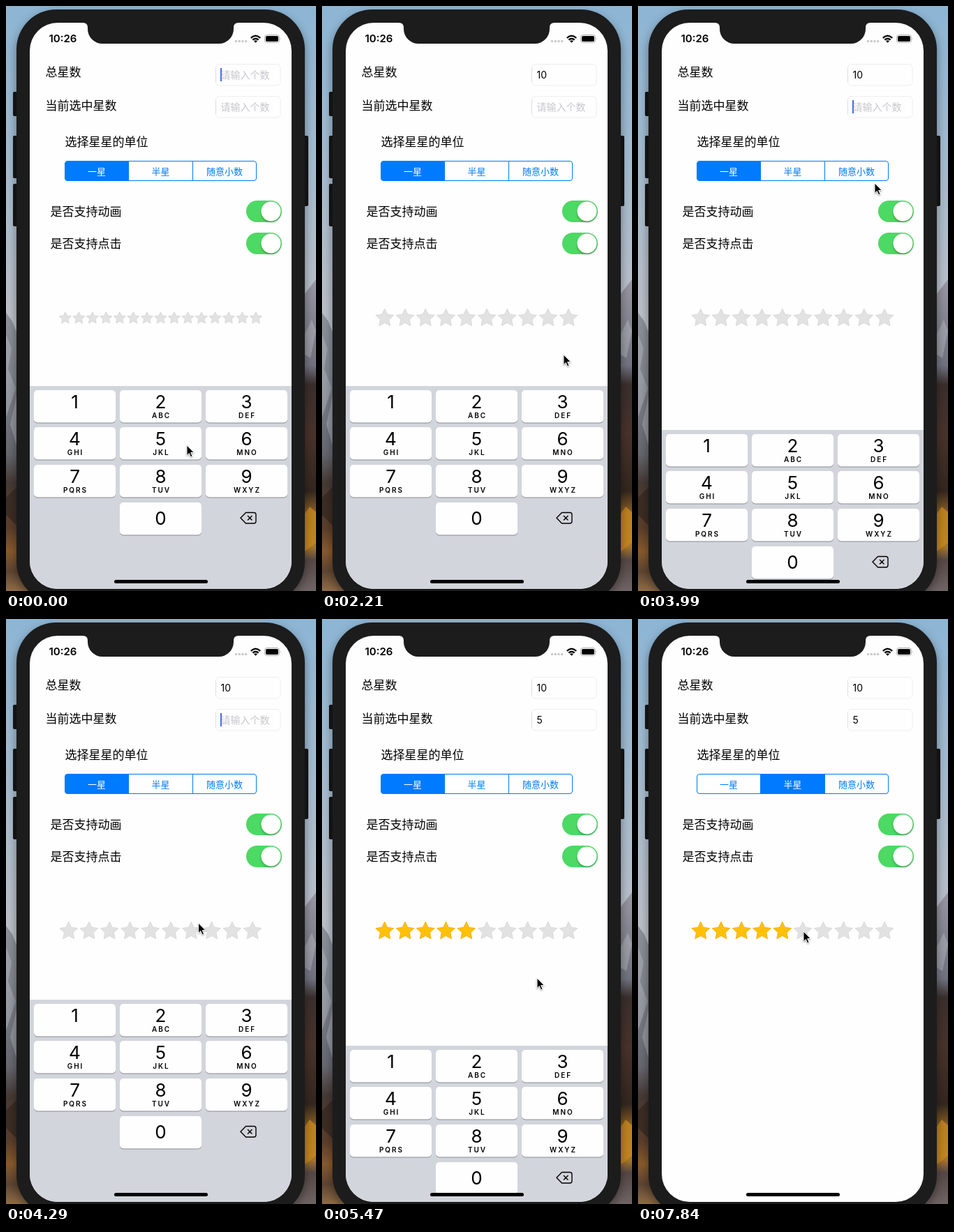
Write an HTML page that moves like this. It is 444x839 px and loops after 7.99 s.

```html
<!DOCTYPE html>
<html lang="zh-CN">
<head>
<meta charset="utf-8">
<style>
html, body { margin: 0; width: 100%; height: 100%; overflow: hidden; }
svg { display: block; width: 444px; height: 839px; font-family: Inter, "Noto Sans CJK SC", "Noto Sans CJK", sans-serif; }
.label { font-size: 17px; }
.field { font-size: 14px; }
.hint { fill: #c7c7cd; }
.seg { font-size: 13px; text-anchor: middle; }
.digit { font-size: 26px; text-anchor: middle; }
.abc { font-size: 10px; font-weight: 600; letter-spacing: 2px; text-anchor: middle; }
</style>
</head>
<body>
<svg id="stage" viewBox="0 0 444 839">
  <defs>
    <linearGradient id="sky" x2="0" y2="1">
      <stop stop-color="#8cb5d4"/><stop offset=".13" stop-color="#98b9d3"/>
      <stop offset=".32" stop-color="#a9bccd"/><stop offset=".52" stop-color="#bcc0c9"/>
    </linearGradient>
    <linearGradient id="rock" gradientUnits="userSpaceOnUse" x2="0" y1="430" y2="839">
      <stop stop-color="#8f939c"/><stop offset=".25" stop-color="#82868f"/>
      <stop offset=".52" stop-color="#66676f"/><stop offset=".62" stop-color="#463a35"/>
      <stop offset=".78" stop-color="#5c3e2a"/><stop offset=".86" stop-color="#8a5b2c"/>
      <stop offset=".93" stop-color="#5f4532"/><stop offset="1" stop-color="#8f6c46"/>
    </linearGradient>
    <linearGradient id="cliff" gradientUnits="userSpaceOnUse" x2="0" y1="390" y2="839">
      <stop stop-color="#9a98a3"/><stop offset=".28" stop-color="#717380"/>
      <stop offset=".34" stop-color="#3a2f2d"/><stop offset=".5" stop-color="#49332b"/>
      <stop offset=".68" stop-color="#33271f"/><stop offset=".75" stop-color="#8a5f25"/>
      <stop offset=".86" stop-color="#a8762a"/><stop offset=".9" stop-color="#564846"/>
      <stop offset="1" stop-color="#6f6564"/>
    </linearGradient>
    <clipPath id="screen"><rect x="34" y="24" width="375" height="812" rx="40"/></clipPath>
  </defs>

  <rect width="444" height="839" fill="url(#sky)"/>
  <path d="M0 440L9 452 16 470 34 490V839H0z" fill="url(#rock)"/>
  <path d="M0 470L8 492 3 520 14 548 0 590zM15 560L6 600 15 630z" fill="#b7bac0" opacity=".45"/>
  <path d="M0 705L15 690V745L0 730z" fill="#33261f" opacity=".7"/>
  <path d="M410 440L430 410 444 392V839H410z" fill="url(#cliff)"/>
  <path d="M428 470L438 450 444 466 436 505 428 500z" fill="#c6c5cb" opacity=".4"/>
  <path d="M428 728L435 718 444 726V770L428 782z" fill="#c98a20" opacity=".8"/>

  <g fill="#171717">
    <rect x="10" y="123" width="8" height="35" rx="2"/>
    <rect x="10" y="186" width="8" height="61" rx="2"/>
    <rect x="10" y="255" width="8" height="61" rx="2"/>
    <rect x="425" y="186" width="8" height="101" rx="2"/>
  </g>
  <rect x="15" y="5" width="413" height="850" rx="57" fill="#1c1c1c" style="filter:drop-shadow(0 6px 7px #0006)"/>

  <g clip-path="url(#screen)">
    <rect x="34" y="24" width="375" height="812" fill="#fefefe"/>
    <text x="61.5" y="52" font-size="15" font-weight="600">10:26</text>
    <g fill="#c8c8cb">
      <circle cx="329.5" cy="50.5" r="1.7"/><circle cx="334.3" cy="50.5" r="1.7"/>
      <circle cx="339" cy="50.5" r="1.7"/><circle cx="343.7" cy="50.5" r="1.7"/>
    </g>
    <g fill="none" stroke="#000" stroke-width="2.3">
      <path d="M350.8 45.8Q357.5 39.4 364.2 45.8M353.4 48.6Q357.5 44.8 361.6 48.6"/>
    </g>
    <path d="M355 50.3Q357.5 48.2 360 50.3L357.5 52.8z"/>
    <rect x="370.5" y="41.5" width="21" height="11" rx="3.2" fill="none" stroke="#aaa"/>
    <rect x="372" y="43" width="18" height="8" rx="1.8"/>
    <path d="M392.8 45.2q1.5 1.8 0 3.6z" fill="#aaa"/>

    <g class="label">
      <text x="56.5" y="101">总星数</text>
      <text x="56.5" y="149">当前选中星数</text>
      <text x="84.5" y="201">选择星星的单位</text>
      <text x="63.5" y="301">是否支持动画</text>
      <text x="63.5" y="347">是否支持点击</text>
    </g>
    <g id="boxes" fill="none"></g>
    <text id="total" class="field" x="307.5"/>
    <text id="chosen" class="field" x="307.5"/>
    <rect id="caret" width="2" height="19" fill="#426bf2"/>
    <g id="segments"></g>
    <g id="switches"></g>
    <g id="stars" stroke-width=".9" stroke-linejoin="round"></g>
    <g id="keyboard"></g>
    <rect x="155" y="823" width="134" height="5" rx="2.5"/>
    <path d="M110 23V24Q117 24 117 31V33A21 21 0 0 0 138 54H305A21 21 0 0 0 326 33V31Q326 24 333 24V23z" fill="#1c1c1c"/>
  </g>
  <path id="pointer" d="M0 0V14.6L3.3 11.5 5.6 16.8 8 15.8 5.7 10.5H10.3z" stroke="#fff" stroke-width="1" style="filter:drop-shadow(0 1px 1px #0006)"/>
</svg>
<script>
const LOOP = 7990, STEP = 148, KEYBOARD = 291;
const $ = id => document.getElementById(id);

// Pointer stops: step, x, y
const path = [
  [0, 259, 630], [3, 104, 578], [5, 104, 578], [8, 215, 712], [9, 216, 728], [11, 216, 728],
  [14, 346, 500], [21, 346, 500], [25, 342, 146], [26, 342, 146], [27, 339, 254],
  [31, 212, 618], [32, 212, 620], [33, 212, 620], [36, 308, 515], [42, 308, 515],
  [45, 231, 257], [47, 222, 232], [48, 222, 232], [50, 262, 365], [52, 240, 440], [53, 237, 448]
];
const presses = { 4: 1, 10: 0, 32: 5 };
const letters = ['', 'ABC', 'DEF', 'GHI', 'JKL', 'MNO', 'PQRS', 'TUV', 'WXYZ'];

function key(n) {
  const i = n ? n - 1 : 10;
  const x = 40 + i % 3 * 123, y = Math.floor(551 + Math.floor(i / 3) * 53.7), mid = x + 58.5;
  return `<rect x="${x}" y="${y + 1}" width="117" height="46.5" rx="5" fill="#898b8f"/>
    <rect id="key${n}" x="${x}" y="${y}" width="117" height="46.5" rx="5"/>
    <text class="digit" x="${mid}" y="${y + (n ? 26 : 32)}">${n}</text>
    <text class="abc" x="${mid + 1}" y="${y + 39.5}">${n ? letters[i] : ''}</text>`;
}

$('keyboard').innerHTML = '<rect x="34" y="545" width="375" height="292" fill="#d2d5db"/>' +
  [...Array(10).keys()].map(key).join('') +
  `<path d="M343.5 726.5H355Q358 726.5 358 729.5V739Q358 742 355 742H343.5L336 734.2zM346 731l6.5 6.5m0-6.5l-6.5 6.5"
    fill="none" stroke="#000" stroke-width="1.4" stroke-linejoin="round"/>`;

$('boxes').innerHTML = [83.5, 129.5].map(y =>
  `<rect x="300.5" y="${y}" width="92.5" height="30.5" rx="5" stroke="#ccc" stroke-width=".33"/>
   <path d="M300.5 ${y + 5}v20.5" stroke="#dedede"/>`).join('');

$('switches').innerHTML = [279, 325].map(y =>
  `<rect x="344" y="${y}" width="51" height="31" rx="15.5" fill="#4cd964"/>
   <circle cx="379.5" cy="${y + 15.5}" r="14" fill="#fff" style="filter:drop-shadow(0 2px 1.5px #0004)"/>`).join('');

function drawSegments(active) {
  const edges = [84.5, 175.5, 267.5, 358.5];
  const fill = active ? 'M175.5 222.5h92v28h-92z' : 'M175.5 222.5h-87q-4 0-4 4v20q0 4 4 4h87z';
  $('segments').innerHTML = `<path d="${fill}" fill="#007aff"/>
    <rect x="84.5" y="222.5" width="274" height="28" rx="3.5" fill="none" stroke="#007aff"/>
    <path d="M175.5 222v29M267.5 222v29" stroke="#007aff"/>` +
    ['一星', '半星', '随意小数'].map((s, i) =>
      `<text class="seg" x="${(edges[i] + edges[i + 1]) / 2}" y="241.5" fill="${i === active ? '#fff' : '#007aff'}">${s}</text>`).join('');
}

function star(cx, cy, r) {
  return Array.from({ length: 10 }, (_, i) => {
    const a = i * Math.PI / 5, d = i % 2 ? r * .49 : r;
    return `${(cx + d * Math.sin(a)).toFixed(2)},${(cy - d * Math.cos(a)).toFixed(2)}`;
  }).join(' ');
}

function drawStars(count, gold) {
  const [r, first] = count === 15 ? [9, 84.8] : [13.5, 89.7];
  const pitch = (442.8 - 2 * first) / (count - 1);
  $('stars').innerHTML = Array.from({ length: count }, (_, i) => {
    const colors = i < gold ? 'fill="#ffc107" stroke="#f7ab0a"' : 'fill="#e2e2e2" stroke="#d6d6d6"';
    return `<polygon points="${star(first + i * pitch, 447.7, r)}" ${colors}/>`;
  }).join('');
}

function setField(id, value, y) {
  const el = $(id);
  el.textContent = value || '请输入个数';
  el.setAttribute('y', value ? y : y + .5);
  el.classList.toggle('hint', !value);
}

const settle = ms => ms < 0 ? 0 : 1 - Math.exp(-ms / 63);

function keyboardDrop(t) {
  if (t < 3900) return KEYBOARD * settle(t - 2225);
  return KEYBOARD * (t < 5455 ? 1 - settle(t - 3900) : settle(t - 5459.5));
}

function pointerAt(k) {
  const i = path.findIndex(p => p[0] >= k);
  if (i < 1) return path[0].slice(1);
  const [a, x0, y0] = path[i - 1], [b, x1, y1] = path[i];
  const u = (k - a) / (b - a), e = u * u * (3 - 2 * u);
  return [x0 + (x1 - x0) * e, y0 + (y1 - y0) * e];
}

function draw(k) {
  const total = k < 5 ? '' : k < 11 ? '1' : '10', chosen = k < 33 ? '' : '5';
  setField('total', total, 103.6);
  setField('chosen', chosen, 149.8);

  const second = k >= 27;
  const typed = second ? chosen : total;
  $('caret').setAttribute('x', 307 + [0, 8, 16][typed.length]);
  $('caret').setAttribute('y', second ? 135 : 89);
  $('caret').setAttribute('visibility', k < 15 || second && k < 37 ? 'visible' : 'hidden');

  drawSegments(k < 48 ? 0 : 1);
  drawStars(k < 15 ? 15 : 10, k < 37 ? 0 : 5);
  for (let n = 0; n < 10; n++) $('key' + n).setAttribute('fill', presses[k] === n ? '#b8c5d1' : '#fefefe');
  $('keyboard').setAttribute('transform', `translate(0 ${Math.round(keyboardDrop(k * STEP))})`);
  $('pointer').setAttribute('transform', `translate(${pointerAt(k)})`);
}

let shown = -1;
function tick() {
  const k = Math.min(53, Math.floor((performance.now() % LOOP + 12) / STEP));
  if (k !== shown) draw(shown = k);
  requestAnimationFrame(tick);
}
tick();
</script>
</body>
</html>
```
